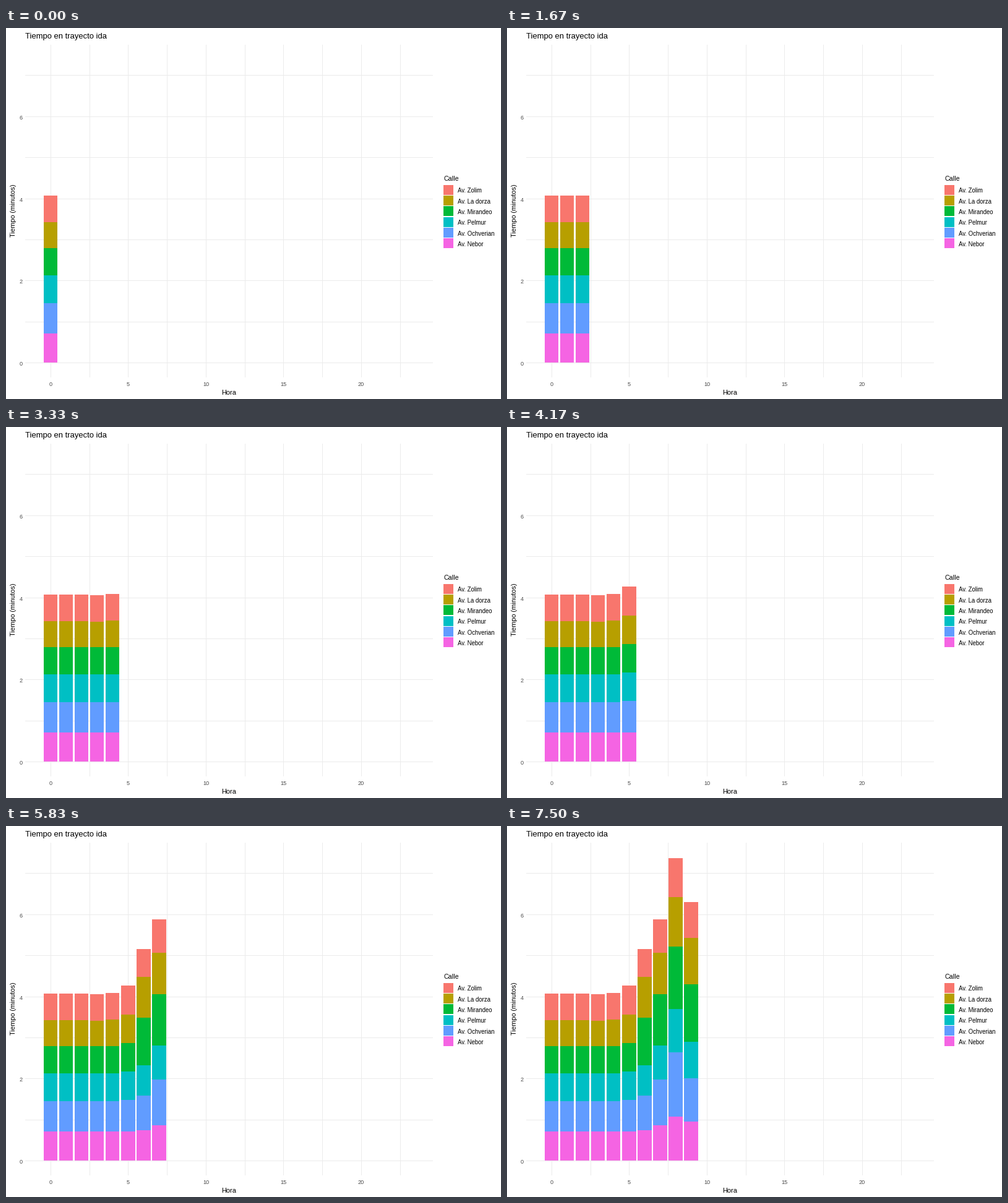
Write a matplotlib script that moves like this. It is 800 by 600 pixels and loops after 8000 ms.

```python
from math import floor

import matplotlib.pyplot as plt
from matplotlib.animation import FuncAnimation
from matplotlib.patches import Rectangle

W, H = 800, 600
LOOP, STEP = 8000, 20
HOURS_PER_SEC = 1.2

# Panel geometry in pixels
LEFT, RIGHT, TOP, BOTTOM = 31, 690, 27, 565
X0, HOUR = 72.3, 25.1
Y0, MINUTE = 541.6, 66.38
HALF_BAR = 0.45 * HOUR

GRID = "#EBEBEB"
TICK = "#4D4D4D"
STREETS = [
    ("Av. Zolim", "#F8766D"),
    ("Av. La dorza", "#B79F00"),
    ("Av. Mirandeo", "#00BA38"),
    ("Av. Pelmur", "#00BFC4"),
    ("Av. Ochverian", "#619CFF"),
    ("Av. Nebor", "#F564E3"),
]

# Upper edge of each segment, from the lowest street to the highest
NIGHT = [494, 445, 400, 356, 314, 271]
STACKS = [
    NIGHT,
    NIGHT,
    NIGHT,
    [494, 445, 400, 356, 315, 272],
    [494, 445, 400, 356, 313, 270],
    [494, 443, 397, 351, 305, 258],
    [492, 436, 387, 310, 244, 199],
    [484, 410, 355, 272, 205, 151],
    [470, 366, 296, 195, 115, 52],
    [478, 408, 349, 256, 181, 123],
]

plt.rcParams["font.family"] = "Liberation Sans"
fig = plt.figure(figsize=(W / 100, H / 100), dpi=100, facecolor="white")
ax = fig.add_axes([0, 0, 1, 1])
ax.set_xlim(0, W)
ax.set_ylim(H, 0)
ax.axis("off")


def x_px(hour):
    return floor(X0 + HOUR * hour)


def y_px(minutes):
    return floor(Y0 - MINUTE * minutes)


def box(x1, y1, x2, y2, color, z=1):
    patch = Rectangle((x1, y1), x2 - x1, y2 - y1, facecolor=color,
                      linewidth=0, antialiased=False, zorder=z)
    return ax.add_patch(patch)


def label(x, y, text, px, color="black", ha="left", angle=0):
    ax.text(x, y, text, fontsize=px * 0.72, color=color, ha=ha,
            va="baseline", rotation=angle, rotation_mode="anchor")


def draw_grid():
    for i in range(10):
        x = x_px(2.5 * i)
        box(x, TOP, x + 1, BOTTOM, GRID)
        if i % 2 == 0:
            label(x, 579, str(5 * i // 2), 9.2, TICK, "center")
    for minutes in range(8):
        y = y_px(minutes)
        box(LEFT, y, RIGHT, y + 1, GRID)
        if minutes % 2 == 0:
            label(26.5, y + 5, str(minutes), 9.2, TICK, "right")


def draw_legend():
    label(707, 247, "Calle", 10.6)
    for i, (name, color) in enumerate(STREETS):
        shift = 17.28 * i
        top = floor(254.3 + shift)
        box(707, top, 723, top + 16, color)
        label(730, round(266.4 + shift), name, 9.7)


def draw_bar(hour, tops):
    center = X0 + HOUR * hour
    x1, x2 = floor(center - HALF_BAR), floor(center + HALF_BAR)
    edges = [y_px(0)] + tops
    colors = [color for _, color in reversed(STREETS)]
    return [box(x1, top, x2, base, color, 2)
            for base, top, color in zip(edges, tops, colors)]


draw_grid()
draw_legend()
label(31, 17, "Tiempo en trayecto ida", 13)
label(360.5, 593, "Hora", 11, ha="center")
label(15, 295, "Tiempo (minutos)", 11, ha="center", angle=90)
bars = [draw_bar(hour, tops) for hour, tops in enumerate(STACKS)]


def update(i):
    # One more hour appears every 5/6 s
    last = floor((i * STEP + 15) / 1000 * HOURS_PER_SEC)
    for hour, bar in enumerate(bars):
        for part in bar:
            part.set_visible(hour <= last)
    return [part for bar in bars for part in bar]


anim = FuncAnimation(fig, update, frames=LOOP // STEP, interval=STEP,
                     repeat=True, repeat_delay=0, blit=False)
plt.show()
```
